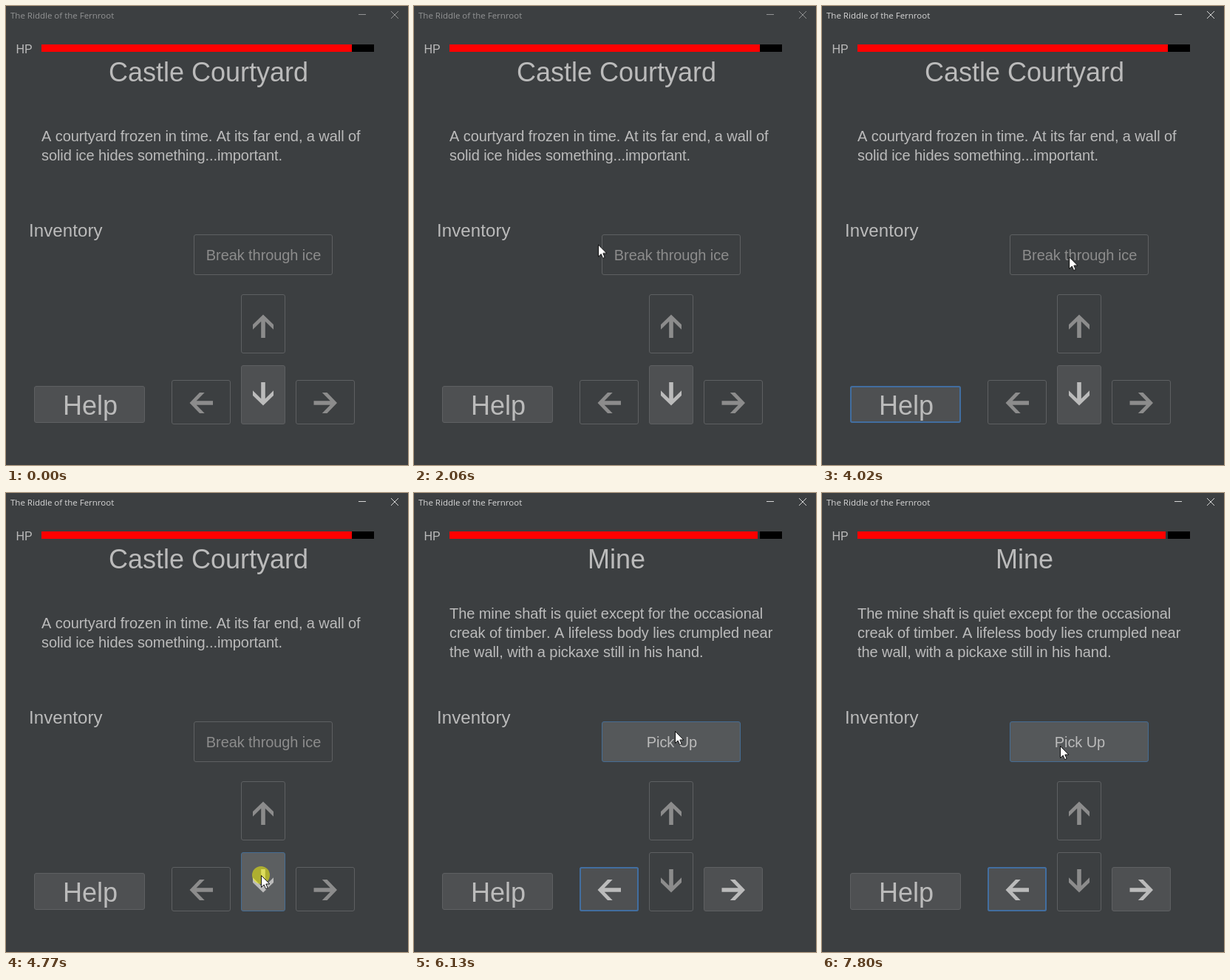
These frames come from a looping animation (544x621 px, 8000 ms). An HTML page:

```html
<!DOCTYPE html>
<html lang="en">
<head>
<meta charset="utf-8">
<title>Text adventure</title>
<style>
  html, body { margin: 0; width: 100%; height: 100%; overflow: hidden; background: #3c3f41; }
  svg { display: block; }

  :root {
    --bg: #3c3f41; --face: #4e5052; --hover: #55585a; --press: #5c5f61;
    --edge: #5e6062; --focus: #466d94; --text: #bbb; --dim: #8c8c8c;
  }

  text { font-family: "Liberation Sans", Arial, sans-serif; font-kerning: none; fill: var(--text); }
  .h1 { font-size: 36px; }
  .h2 { font-size: 24px; letter-spacing: .1px; }
  .body { font-size: 20px; letter-spacing: -.08px; }
  .mid { text-anchor: middle; }

  /* Everything shares one 8 s clock; 1% = 80 ms. */
  .anim { animation: 8s step-end infinite; }

  /* Window frame */
  #bar { animation-name: bar; fill: currentColor; stroke: currentColor; }
  #bar text { font: 11.5px "Open Sans", "Noto Sans", sans-serif; fill: currentColor; stroke: none; }
  @keyframes bar { 0% { color: #929394; } 33.875%, 100% { color: #d6d6d6; } }

  #hp { animation-name: hp; }
  @keyframes hp {
    0% { width: 420px; }
    60.5% { width: 418px; }
    68.125%, 100% { width: 417px; }
  }

  /* Rooms */
  #yard { animation-name: yard; }
  #wall { animation-name: wall; }
  #mine { animation-name: mine; }
  @keyframes yard { 0% { visibility: visible; } 60.5%, 100% { visibility: hidden; } }
  @keyframes wall { 0% { visibility: hidden; } 60.5% { visibility: visible; } 68.125%, 100% { visibility: hidden; } }
  @keyframes mine { 0% { visibility: hidden; } 68.125%, 100% { visibility: visible; } }

  /* Buttons: group fill and stroke style the box, color styles the icon. */
  .btn { fill: var(--bg); stroke: var(--edge); color: var(--dim); }
  .btn use { fill: currentColor; stroke: none; }
  .btn text { stroke: none; }
  .ring { fill: none; stroke: #426ea0; stroke-width: 2; }
  #help { fill: var(--face); }

  #help-ring { animation-name: help-ring; }
  @keyframes help-ring {
    0%, 59.625%, 67.375%, 100% { visibility: hidden; }
    33.875%, 60.5% { visibility: visible; }
  }

  #left-ring { animation-name: left-ring; }
  @keyframes left-ring { 0% { visibility: hidden; } 67.375%, 100% { visibility: visible; } }

  #up { animation-name: up; }
  @keyframes up {
    0% { fill: var(--bg); color: var(--dim); }
    60.5% { fill: var(--face); color: var(--text); }
    68.125%, 100% { fill: var(--bg); color: var(--dim); }
  }

  #down { animation-name: down; }
  @keyframes down {
    0% { fill: var(--face); stroke: var(--edge); color: var(--text); }
    52.2% { fill: var(--hover); stroke: var(--focus); color: var(--text); }
    59.625% { fill: var(--press); stroke: var(--focus); color: var(--text); }
    60.5%, 100% { fill: var(--bg); stroke: var(--edge); color: var(--dim); }
  }

  #left { animation-name: left; }
  @keyframes left {
    0% { fill: var(--bg); stroke: var(--edge); color: var(--dim); }
    60.5% { fill: var(--face); stroke: var(--edge); color: var(--text); }
    64.2% { fill: var(--hover); stroke: var(--focus); color: var(--text); }
    67.375% { fill: var(--press); stroke: var(--focus); color: var(--text); }
    68.125% { fill: var(--hover); stroke: var(--focus); color: var(--text); }
    71.9%, 100% { fill: var(--face); stroke: var(--focus); color: var(--text); }
  }

  #right { animation-name: right; }
  @keyframes right {
    0% { fill: var(--bg); color: var(--dim); }
    60.5%, 100% { fill: var(--face); color: var(--text); }
  }

  #action { animation-name: action; }
  @keyframes action {
    0% { fill: var(--bg); stroke: var(--edge); }
    68.125% { fill: var(--face); stroke: var(--edge); }
    75% { fill: var(--hover); stroke: var(--focus); }
    88.9% { fill: var(--face); stroke: var(--edge); }
    91.6%, 100% { fill: var(--hover); stroke: var(--focus); }
  }

  /* Pointer */
  #pointer { animation: travel 8s linear infinite; }
  @keyframes travel {
    0%, 5.24% { transform: translate(504px, 640px); }
    5.25% { transform: translate(499px, 603px); animation-timing-function: ease-out; }
    10.875%, 14% { transform: translate(338px, 353px); }
    14.875%, 19.37% { transform: translate(333px, 353px); }
    19.375% { transform: translate(348px, 352px); }
    21% { transform: translate(383px, 330px); }
    22.6% { transform: translate(350px, 301px); }
    23.8% { transform: translate(310px, 296px); }
    25.6% { transform: translate(246px, 320px); }
    27.2% { transform: translate(275px, 345px); }
    28.2% { transform: translate(310px, 350px); }
    29.125%, 50.24% { transform: translate(334px, 333px); }
    50.25% { transform: translate(334px, 338px); animation-timing-function: ease-out; }
    53.75%, 63.25% { transform: translate(345px, 517px); animation-timing-function: ease-in-out; }
    65.75%, 71.375% { transform: translate(263px, 519px); animation-timing-function: ease-out; }
    76.625%, 87.625% { transform: translate(353px, 322px); }
    89.4% { transform: translate(368px, 299px); }
    90.4% { transform: translate(356px, 292px); }
    91.6% { transform: translate(325px, 309px); }
    93.7% { transform: translate(300px, 340px); }
    95.3% { transform: translate(306px, 358px); }
    97.5%, 100% { transform: translate(322px, 342px); }
  }

  #click { animation-name: click; }
  @keyframes click {
    0%, 34.625%, 36.875%, 39%, 61.375%, 68.625%, 100% { visibility: hidden; }
    33.875%, 36%, 38.125%, 59.625%, 67.375% { visibility: visible; }
  }
</style>
</head>
<body>
<svg width="544" height="621" viewBox="0 0 544 621">
  <defs>
    <path id="arrow" d="M0-16 14-2.5V4.2L2.8-6.8V15.5H-2.8V-6.8L-14 4.2V-2.5Z"/>
  </defs>
  <rect width="544" height="621" fill="#3c3f41"/>

  <g id="bar" class="anim">
    <text x="6" y="17">The Riddle of the Fernroot</text>
    <path d="M477 11.5H487" fill="none"/>
    <path d="M521 7 531 17M531 7 521 17" fill="none"/>
  </g>

  <text x="13.5" y="64" font-size="16">HP</text>
  <rect x="48" y="52" width="420" height="10" fill="#2f3235"/>
  <rect x="468" y="52" width="30" height="10" fill="#000"/>
  <rect id="hp" class="anim" x="48" y="52" width="420" height="10" fill="#f00"/>

  <text class="h2" x="31" y="312">Inventory</text>

  <g id="help" class="btn">
    <rect x="38.5" y="514.5" width="149" height="49" rx="2.5"/>
    <rect id="help-ring" class="anim ring" x="39" y="515" width="148" height="48" rx="2"/>
    <text class="h1 mid" x="114" y="553">Help</text>
  </g>
  <g id="action" class="anim btn">
    <rect x="254.5" y="309.5" width="187" height="54" rx="2.5"/>
  </g>
  <g id="up" class="anim btn">
    <rect x="318.5" y="390.5" width="59" height="79" rx="2.5"/>
    <use href="#arrow" transform="translate(348 433.5)"/>
  </g>
  <g id="down" class="anim btn">
    <rect x="318.5" y="486.5" width="59" height="79" rx="2.5"/>
    <use href="#arrow" transform="translate(348 524.5) rotate(180)"/>
  </g>
  <g id="left" class="anim btn">
    <rect x="224.5" y="506.5" width="79" height="59" rx="2.5"/>
    <rect id="left-ring" class="anim ring" x="225" y="507" width="78" height="58" rx="2"/>
    <use href="#arrow" transform="translate(264.5 537) rotate(-90)"/>
  </g>
  <g id="right" class="anim btn">
    <rect x="392.5" y="506.5" width="79" height="59" rx="2.5"/>
    <use href="#arrow" transform="translate(432 537) rotate(90)"/>
  </g>

  <g id="yard" class="anim">
    <text class="h1 mid" x="274" y="102">Castle Courtyard</text>
    <text class="body" x="48" y="183">A courtyard frozen in time. At its far end, a wall of</text>
    <text class="body" x="48" y="209">solid ice hides something...important.</text>
    <text class="body mid" x="348.5" y="344" style="fill: var(--dim)">Break through ice</text>
  </g>
  <g id="wall" class="anim">
    <text class="h1 mid" x="274" y="102">Castle Wall</text>
    <text class="body" x="48" y="170">Part of the wall has collapsed, leaving a gap just</text>
    <text class="body" x="48" y="196">wide enough to squeeze through. You may have</text>
    <text class="body" x="48" y="222">found another way in.</text>
  </g>
  <g id="mine" class="anim">
    <text class="h1 mid" x="274" y="102">Mine</text>
    <text class="body" x="48" y="170">The mine shaft is quiet except for the occasional</text>
    <text class="body" x="48" y="196">creak of timber. A lifeless body lies crumpled near</text>
    <text class="body" x="48" y="222">the wall, with a pickaxe still in his hand.</text>
    <text class="body mid" x="349" y="344">Pick Up</text>
  </g>

  <g id="pointer">
    <circle id="click" class="anim" r="12" fill="#ff0" fill-opacity=".5"/>
    <path d="M.5.5V16.5L4.2 13 6.6 18.6 9.2 17.5 6.8 12H11.8Z" fill="#fff" stroke="#000" stroke-width=".9"/>
  </g>
</svg>
</body>
</html>
```
